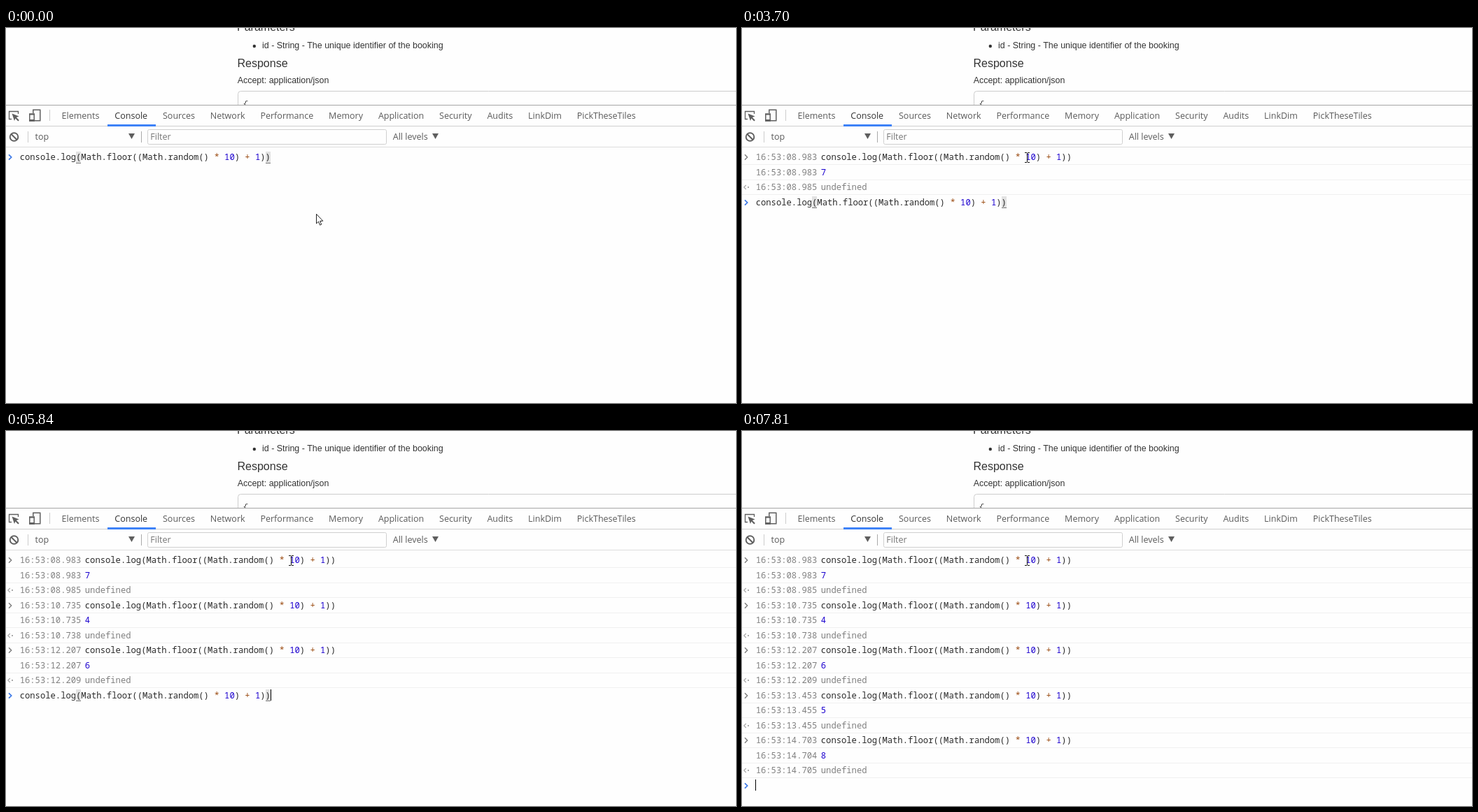
Write an HTML page with a canvas that moves like this. It is 1043 by 537 pixels and loops after 8000 ms.

```html
<!DOCTYPE html>
<html lang="en">
<head>
<meta charset="utf-8">
<title>Console</title>
<style>
html, body { margin: 0; width: 100%; height: 100%; overflow: hidden; background: #fefefe; }
canvas { display: block; }
</style>
</head>
<body>
<canvas id="stage" width="1043" height="537"></canvas>
<script>
const ctx = document.getElementById('stage').getContext('2d');
const W = 1043, H = 537, LOOP = 8000;
const BG = '#fefefe', ICON = '#5f5f5f', GRAY = '#808080', INK = '#2a2a2a';
const BLUE = '#3b78e7', NUM = '#1c00cf', OPERATOR = '#9a4a10';
const MONO = '12.18px "Noto Sans Mono", monospace';
const UI = '12.5px "Open Sans", sans-serif';
const DOC = '12.45px "Liberation Sans", sans-serif';
const HEAD = '16px "Liberation Sans", sans-serif';

const TABS = 'Elements Console Sources Network Performance Memory Application Security Audits LinkDim PickTheseTiles';
const CODE = 'console.log(Math.floor((Math.random() * 10) + 1))';
const CHAR = 7.31, LEFT = 19.7, INDENT = 112.8, ROW = 21.5;

// Seconds of the command, the printed number and the return value, then the number
const RUNS = ['08.983 08.983 08.985 7', '10.735 10.735 10.738 4', '12.207 12.207 12.209 6',
  '13.453 13.455 13.455 5', '14.703 14.704 14.705 8'].map(run => run.split(' '));

// Key times: a click, then recalling and running the command in turn
const CLICK = 700, BLINK = 495;
const RECALL = [0, 3170, 4690, 5840, 7070];
const ENTER = [2060, 3820, 5250, 6510, 7810];

const past = (list, t) => list.filter(time => time <= t);

function rect(x, y, w, h, color) {
  ctx.fillStyle = color;
  ctx.fillRect(x, y, w, h);
}

function text(str, x, y, font, color) {
  ctx.font = font;
  ctx.fillStyle = color;
  ctx.fillText(str, x, y);
}

function path(points, closed) {
  ctx.beginPath();
  points.forEach(([x, y]) => ctx.lineTo(x, y));
  if (closed) ctx.closePath();
}

function stroke(color, width = 1) {
  ctx.strokeStyle = color;
  ctx.lineWidth = width;
  ctx.stroke();
}

function line(points, color, width) {
  path(points);
  stroke(color, width);
}

function shape(points, color) {
  path(points, true);
  ctx.fillStyle = color;
  ctx.fill();
}

function box(x, y, w, h, r, color, width) {
  ctx.beginPath();
  ctx.roundRect(x + .5, y + .5, w, h, r);
  stroke(color, width);
}

function dot(x, y, r) {
  ctx.beginPath();
  ctx.arc(x, y, r, 0, 7);
}

function page() {
  const ink = '#333';
  text('Parameters', 330, 4, HEAD, ink);
  dot(354.8, 26, 2.2);
  ctx.fill();
  text('id - String - The unique identifier of the booking', 366, 29, DOC, ink);
  text('Response', 330.5, 56, HEAD, ink);
  text('Accept: application/json', 330.7, 79, DOC, ink);
  box(331, 90, 760, 80, 4, '#ccc');
  text('{', 338.5, 112, 'italic 11.5px "Liberation Mono", monospace', ink);
}

function icons() {
  // Element picker
  line([[8, 130.5], [4.5, 130.5], [4.5, 119.5], [17.5, 119.5], [17.5, 123]], ICON, 1.3);
  shape([[8.5, 122.5], [18.5, 126.5], [14.8, 128], [18.8, 132], [17.3, 133.4], [13.4, 129.4], [12, 133]], ICON);
  // Device switch
  box(38.3, 116.7, 10, 15.6, 0, ICON, 1.5);
  rect(33, 122, 8, 12, BG);
  box(33.3, 122.7, 6.4, 9.8, 0, ICON, 1.5);
  rect(33, 122.5, 8, 2, ICON);
  rect(33, 131, 8, 2.5, ICON);
  // Clear
  dot(11.5, 156, 5.8);
  stroke(ICON, 1.9);
  line([[7.5, 152], [15.5, 160]], ICON, 1.9);
}

function triangle(x, y) {
  shape([[x, y], [x + 9, y], [x + 4.5, y + 8]], ICON);
}

function tabs() {
  let x = 79.6;
  TABS.split(' ').forEach(name => {
    const active = name === 'Console';
    text(name, x, 130, UI, active ? '#333' : '#5a5a5a');
    const width = ctx.measureText(name).width;
    if (active) rect(Math.round(x - 10.5), 138, Math.round(width + 22), 3, '#3e82f7');
    x += width + 21.9;
  });
}

function devtools() {
  rect(0, 110, W, H - 110, BG);
  rect(0, 110, W, 1, '#a5a5a5');
  rect(0, 140, W, 1, '#cfcfcf');
  rect(0, 170, W, 1, '#dcdcdc');
  tabs();
  icons();
  rect(62, 117, 1, 16, '#ccc');
  rect(31, 148, 1, 16, '#ccc');
  rect(193, 148, 1, 16, '#aaa');
  text('top', 41.5, 160, UI, '#5a5a5a');
  triangle(175, 151);
  box(202, 145, 341, 21, 2, '#d0d0d0');
  text('Filter', 206.3, 160, UI, '#757575');
  text('All levels', 552.8, 160, UI, '#5a5a5a');
  triangle(609, 151);
}

const rowTop = row => 177 + ROW * row;

function mono(str, x, row, color) {
  text(str, x, Math.round(rowTop(row) + 12), MONO, color);
}

function chevron(x, row, size, color, width) {
  const y = Math.round(rowTop(row)) + 8;
  line([[x, y - Math.abs(size)], [x + size, y], [x, y + Math.abs(size)]], color, width);
}

function code(x, row) {
  for (const { 0: part, index } of CODE.matchAll(/\d+|[*+]|[^\d*+]+/g)) {
    const color = /\d/.test(part) ? NUM : /[*+]/.test(part) ? OPERATOR : INK;
    mono(part, x + index * CHAR, row, color);
  }
}

function block([sent, logged, returned, value], first) {
  [sent, logged, returned].forEach((time, i) => {
    mono('16:53:' + time, LEFT, first + i, GRAY);
    rect(0, Math.floor(rowTop(first + i) + 18.5), W, 1, '#f0f0f0');
  });
  chevron(4, first, 3.7, '#777', 1.3);
  code(INDENT, first);
  mono(value, INDENT, first + 1, NUM);
  chevron(5.8, first + 2, -3, '#aaa', 1.2);
  rect(8, Math.round(rowTop(first + 2)) + 7, 2, 2, '#aaa');
  mono('undefined', INDENT, first + 2, GRAY);
}

function prompt(row, typed, caret) {
  const y = Math.floor(rowTop(row));
  chevron(4, row, 3.7, BLUE, 1.7);
  if (typed) {
    for (const i of [CODE.indexOf('('), CODE.length - 1]) {
      const x = Math.round(LEFT + i * CHAR);
      rect(x, y, 7, 16, '#e2e2e2');
      rect(x, y + 16, 7, 1, '#777');
    }
    code(LEFT, row);
  }
  if (caret) rect(typed ? 378 : 19, y, 1, 16, '#000');
}

function arrow(x, y) {
  const outline = [[.5, .5], [.5, 14], [3.5, 11.2], [5.5, 16.2], [7.7, 15.3], [5.7, 10.5], [9.8, 10.3]];
  shape(outline.map(([dx, dy]) => [x + dx, y + dy]), '#fff');
  stroke('#222');
}

function beam(x, y) {
  rect(x + 3, y + 1, 1, 13, '#111');
  for (const dx of [0, 4]) {
    for (const dy of [0, 14]) rect(x + dx, y + dy, 3, 1, '#111');
  }
}

function pointer(t) {
  if (t < 130) arrow(443, 266);
  else if (t < 270) arrow(429, 230);
  else if (t < 420) arrow(415, 200);
  else beam(t < 850 ? 405 : 404, 178);
}

function draw(t) {
  const runs = past(ENTER, t).length;
  const typed = past(RECALL, t).length > runs;
  const lastKey = Math.max(...past([CLICK, ...RECALL, ...ENTER], t));
  const caret = t >= CLICK && Math.floor((t - lastKey) / BLINK) % 2 === 0;
  rect(0, 0, W, H, BG);
  page();
  devtools();
  RUNS.slice(0, runs).forEach((run, i) => block(run, i * 3));
  prompt(runs * 3, typed, caret);
  pointer(t);
}

const start = performance.now();
function tick() {
  draw((performance.now() - start) % LOOP);
  requestAnimationFrame(tick);
}
tick();
</script>
</body>
</html>
```
